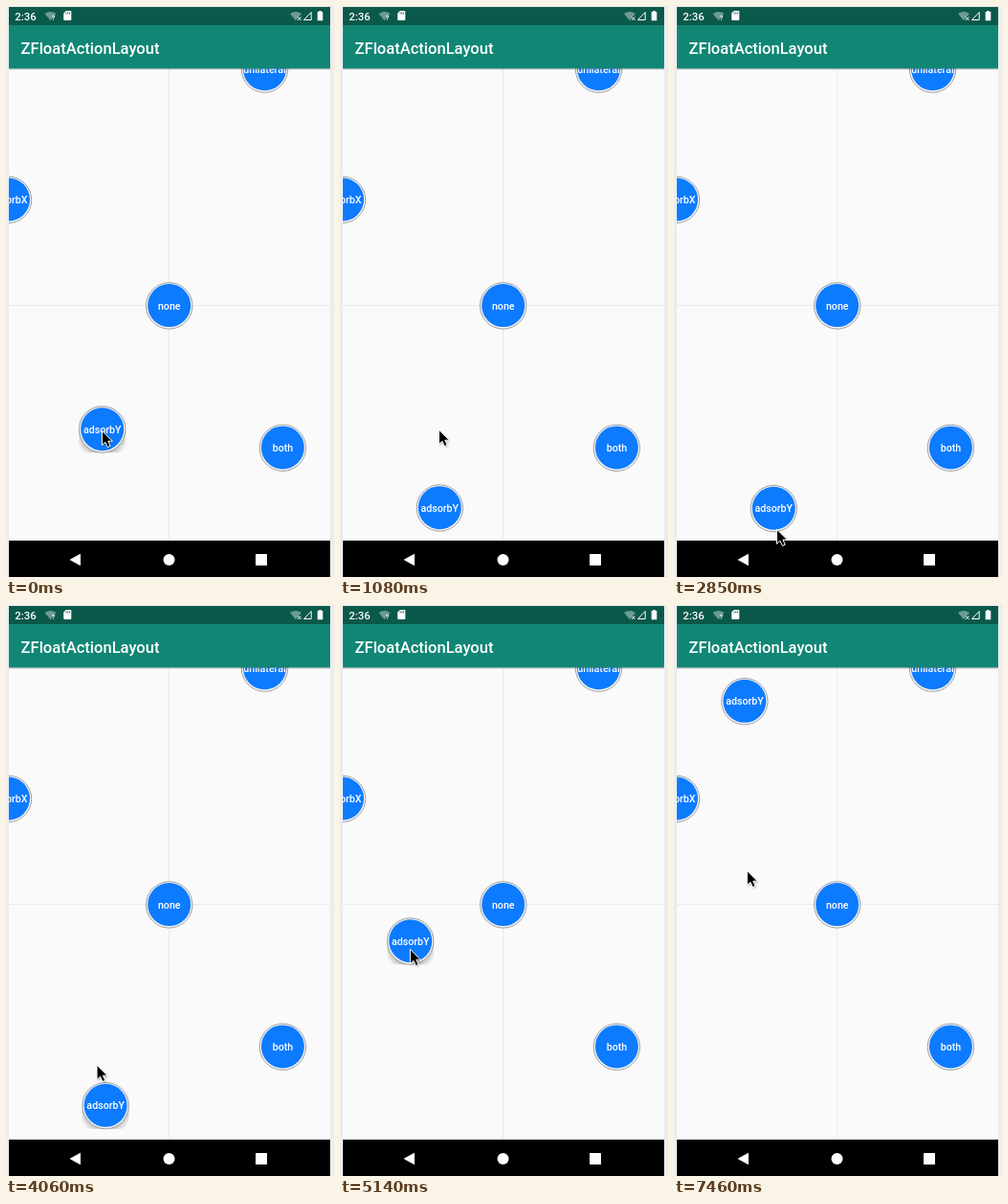
Write an HTML page that moves like this. It is 343 px wide and 596 px high and loops after 8 s.

```html
<!DOCTYPE html>
<html lang="en">
<head>
<meta charset="utf-8">
<title>Floating buttons</title>
<style>
  html, body { margin: 0; width: 100%; height: 100%; overflow: hidden; background: #ececec; }
  svg { display: block; width: 343px; height: 596px; }
  text { font-family: Roboto, "Noto Sans", sans-serif; font-weight: 500; fill: #fff; }
  .label { font-size: 10.65px; text-anchor: middle; }
  .rim { fill: #f4f4f4; stroke: #8b8b8b; stroke-width: .8; }
  .disc { fill: #0d7bff; }
  .guide { fill: #eaeaea; }
</style>
</head>
<body>
<svg viewBox="0 0 343 596">
  <defs>
    <linearGradient id="drop" x2="0" y2="1">
      <stop stop-color="#000" stop-opacity=".25"/>
      <stop offset="1" stop-color="#000" stop-opacity="0"/>
    </linearGradient>
    <filter id="soft" x="-30%" y="-30%" width="160%" height="160%">
      <feGaussianBlur stdDeviation="2.4"/>
    </filter>
    <filter id="faint" x="-50%" y="-50%" width="200%" height="200%">
      <feGaussianBlur stdDeviation=".9"/>
    </filter>
    <clipPath id="content"><rect x="3" y="65" width="336" height="493"/></clipPath>
    <clipPath id="tile"><rect x="-24.5" y="-24.5" width="49" height="49"/></clipPath>
  </defs>

  <rect width="343" height="596" fill="#ececec"/>
  <rect x="3" y="65" width="336" height="493" fill="#fafafa"/>
  <rect class="guide" x="170" y="65" width="1" height="493"/>
  <rect class="guide" x="3" y="312" width="336" height="1"/>
  <g id="buttons" clip-path="url(#content)"></g>

  <rect x="3" y="1" width="336" height="19.5" fill="#0a594b"/>
  <rect x="3" y="20" width="336" height="45.3" fill="#118675"/>
  <rect x="3" y="65.3" width="336" height="2" fill="url(#drop)"/>
  <text x="15.6" y="49.5" font-size="16.53">ZFloatActionLayout</text>
  <text x="9.3" y="15" font-size="11.4">2:36</text>

  <!-- status icons -->
  <g fill="#fff">
    <path d="M40.5 8Q46.5 3.8 52.5 8L46.5 15.2Z" opacity=".4"/>
    <text x="47.5" y="15.3" font-size="8">?</text>
    <path d="M62.8 5H67.3Q68.3 5 68.3 6V14Q68.3 15 67.3 15H61.2Q60.2 15 60.2 14V7.6Z"/>
    <path d="M63 6.5v2M64.8 6.5v2M66.6 6.5v2" stroke="#0a594b" stroke-width=".8"/>
    <path d="M297 8Q303 3.8 309 8L303 15.2Z" opacity=".4"/>
    <path d="M305 11.5l3.5 3.5m0-3.5l-3.5 3.5" stroke="#fff"/>
    <path d="M311.5 14.5L319.2 6.5V14.5Z" fill="none" stroke="#fff"/>
    <path d="M325.7 6H327.3V5H329.7V6H331.3V15.3H325.7Z"/>
  </g>

  <rect x="3" y="558" width="336" height="38" fill="#000"/>
  <g fill="#fff">
    <path d="M67.2 578L77.6 572.3V583.7Z" stroke="#fff" stroke-width=".8" stroke-linejoin="round"/>
    <circle cx="170.5" cy="578" r="6"/>
    <rect x="261" y="572" width="12" height="12" rx=".6"/>
  </g>

  <g id="cursor">
    <g transform="translate(-.6 .3)">
      <path d="M1 2V16.5L4.6 13.2L7 18.5L9.6 17.3L7.3 12.3H12Z" fill="#000" opacity=".35" filter="url(#faint)"/>
      <path d="M0 0V15.2L3.5 12L5.9 17.3L8.7 16L6.4 10.9H11Z" fill="#000" stroke="#fff" stroke-linejoin="round"/>
    </g>
  </g>
</svg>
<script>
const LOOP = 8000;
const TICK = 135.6;
const LEAD = 21;

const linear = p => p;
const out = p => 1 - (1 - p) ** 2;
const inOut = p => (1 - Math.cos(Math.PI * p)) / 2;

// Each move: start, end, target x, target y, easing
const cursorPath = {
  from: [101, 443],
  moves: [
    [0, 390, 104, 442, linear],
    [1620, 2030, 102, 453, linear],
    [2030, 2310, 110, 530, inOut],    // circles around the button
    [2310, 2430, 117, 507, linear],
    [2430, 2580, 120, 534, linear],
    [2580, 2850, 108, 546, linear],
    [3360, 3790, 104, 532, linear],
    [3790, 4060, 96, 482, linear],    // drags it upwards
    [4060, 5020, 74, 359, out],
    [5850, 6370, 74.5, 277, out],
    [7060, 7460, 77, 277, linear]
  ]
};
const buttonPath = {
  from: [100.7, 441.7],
  moves: [
    [0, 390, 104.3, 442, linear],
    [430, 1150, 104.3, 524.3, out],   // settles at the bottom edge
    [3360, 3490, 104.3, 523.3, linear],
    [4030, 4830, 73.7, 350.7, inOut],
    [5980, 6370, 73.9, 269, inOut],
    [6640, 6770, 73.9, 257.5, linear],
    [6770, 6920, 73.9, 116.5, linear],
    [6920, 7460, 73.9, 100.3, linear] // settles at the top edge
  ]
};

const layer = document.getElementById("buttons");
const cursor = document.getElementById("cursor");

function addButton(label, x, y) {
  const g = document.createElementNS("http://www.w3.org/2000/svg", "g");
  g.innerHTML = `
    <g class="lift" clip-path="url(#tile)" opacity="0">
      <circle cy="4" r="25" fill="#000" opacity=".22" filter="url(#soft)"/>
    </g>
    <circle cy=".3" r="24.2" class="rim"/>
    <circle r="22.5" class="disc"/>
    <text class="label" y="4">${label}</text>`;
  layer.append(g);
  place(g, [x, y]);
  return g;
}

function place(node, [x, y]) {
  node.setAttribute("transform", `translate(${x} ${y})`);
}

function pointAt({ from, moves }, t) {
  let [x, y] = from;
  for (const [start, end, toX, toY, ease] of moves) {
    if (t <= start) break;
    const p = ease(Math.min(1, (t - start) / (end - start)));
    x += (toX - x) * p;
    y += (toY - y) * p;
  }
  return [x, y];
}

addButton("unilateral", 270.5, 65.8);
addButton("adsorbX", 2.5, 202);
addButton("none", 170.7, 312.6);
addButton("both", 289.4, 460.9);
const dragged = addButton("adsorbY", ...buttonPath.from);
const lift = dragged.querySelector(".lift");

const begin = performance.now();
function draw() {
  const now = (performance.now() - begin) % LOOP;
  const t = Math.floor((now + LEAD) / TICK) * TICK;
  const pressed = t < TICK || (t > 3400 && t < 6700);
  place(cursor, pointAt(cursorPath, t));
  place(dragged, pointAt(buttonPath, t));
  lift.setAttribute("opacity", pressed ? 1 : 0);
  requestAnimationFrame(draw);
}
draw();
</script>
</body>
</html>
```
